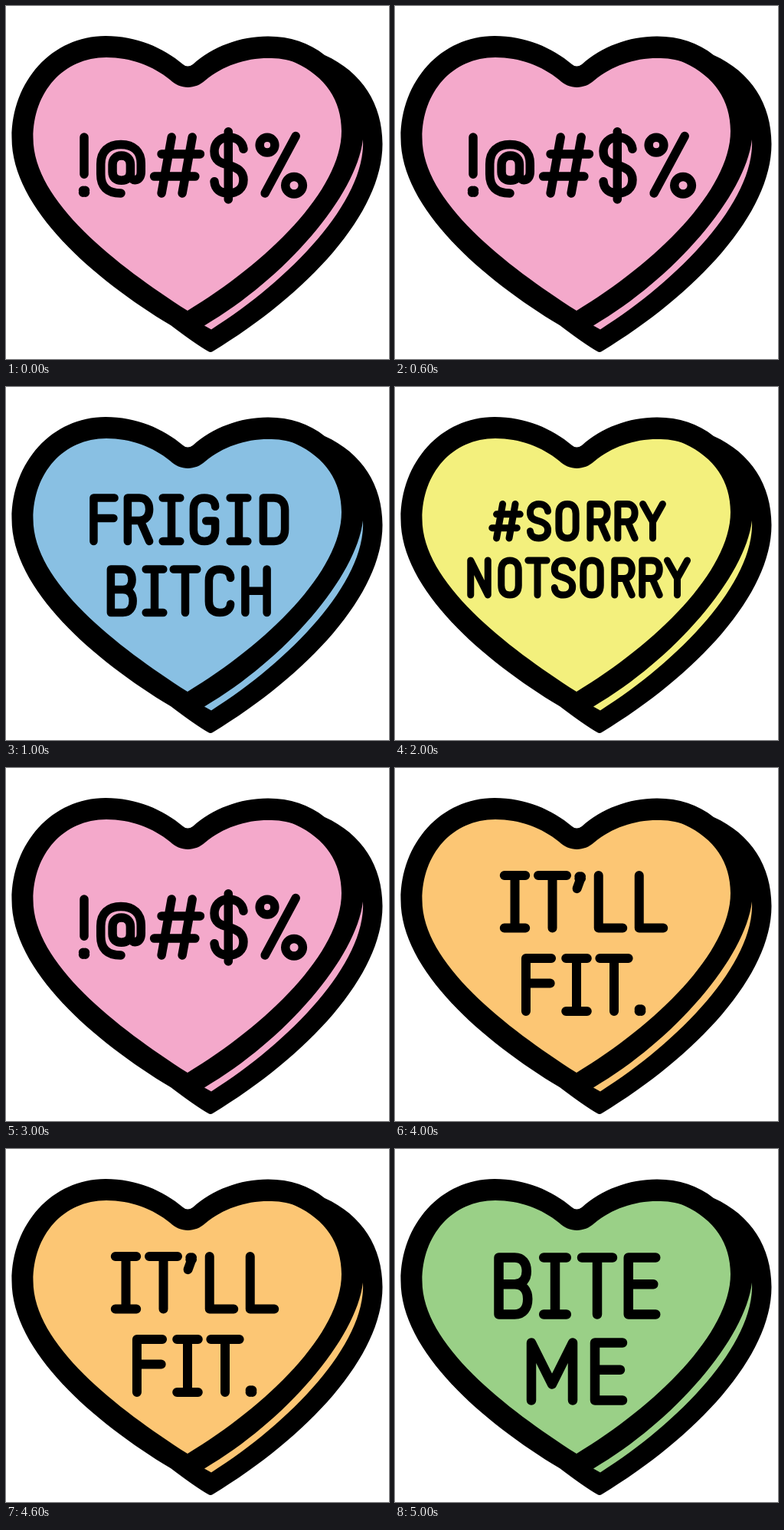
Recreate the animation shown at these times as an HTML page with a canvas. Size 500 by 460 pixels, loop 6 s.

```html
<!DOCTYPE html>
<html lang="en">
<head>
<meta charset="utf-8">
<title>Candy hearts</title>
<style>
  html, body { margin: 0; width: 100%; height: 100%; overflow: hidden; background: #fff; }
  canvas { display: block; width: 500px; height: 460px; }
</style>
</head>
<body>
<canvas id="stage" width="500" height="460" role="img"></canvas>
<script>
const canvas = document.getElementById('stage');
const ctx = canvas.getContext('2d');
const HOLD = 1000;

const outline = new Path2D(`M7.5 172C7.5 98 60 39 130 39C170 39 205 54 231 76Q237 81 244 76
  C270 53 305 39.5 342 39.5C371 39.5 396 48 416 64C465 86 491.5 128 491.5 180
  C491.5 270 394 375 270 450Q267 452 264 450Q248 441 215 416C115 356 7.5 264 7.5 172Z`);
const face = new Path2D(`M35.5 172C35.5 112 75 67 131 67C163 67 192 78 214 96C227 109 247 109 260 97
  C283 78 312 68 342 68C355 68 367 69 378 74C417 92 438 123 438 163
  C438 240 340 335 237 397C145 338 35.5 255 35.5 172Z`);
const side = new Path2D('M466 174C457 248 364 355 259 416.5L268 421.5C370 357 470 255 466 174Z');

const ring = (x, y, r) => `M${x - r} ${y}a${r} ${r} 0 1 0 ${2 * r} 0a${r} ${r} 0 1 0 ${-2 * r} 0Z`;
const dot = (x, y) => `M${x - 2} ${y - 2}l4 4m0-4l-4 4`;
const ess = 'M26 21C24 7 13 0-1 0C-16 0-26 11-26 25C-26 42-15 46 0 50C16 55 26 61 26 76C26 91 15 100-1 100C-15 100-25 93-26 79';
const cee = 'M25 20C25 6 15 0 0 0C-16 0-25 9-25 26V74C-25 91-16 100 0 100C16 100 25 91 25 ';

// Stroke skeletons: centred on x = 0, cap height 100.
const glyphs = {
  B: 'M3 47C18 47 26 58 26 73C26 89 18 100 3 100H-25V0H3C17 0 24 10 24 24C24 38 17 47 3 47H-25',
  C: cee + '80',
  D: 'M-25 0H0C17 0 25 11 25 28V72C25 89 17 100 0 100H-25Z',
  E: 'M24 0H-24V100H24M-24 47H20',
  F: 'M24 0H-24V100M-24 47H22',
  G: cee + '74V53H4',
  H: 'M-25 0V100M25 0V100M-25 50H25',
  I: 'M-20 0H20M0 0V100M-20 100H20',
  L: 'M-23 0V100H23',
  M: 'M-36 100V0L0 72L36 0V100',
  N: 'M-25 100V0L25 100V0',
  O: 'M-25 28C-25 9-15 0 0 0S25 9 25 28V72C25 91 15 100 0 100S-25 91-25 72Z',
  R: 'M-25 100V0H2C18 0 25 12 25 26C25 41 18 52 2 52H-25M4 52L25 100',
  S: ess,
  T: 'M-27 0H27M0 0V100',
  Y: 'M-29 0L0 52L29 0M0 52V100',
  '!': 'M0 0V66' + dot(0, 97),
  '@': 'M0 100C-25 100-36 88-36 66V48C-36 25-22 13 0 13C23 13 36 26 36 47V62C36 80 17 80 17 67V49' +
       'C17 39 11 33 1 33C-9 33-15 39-15 49V62C-15 72-9 77 1 77C11 77 17 72 17 62',
  '#': 'M-28 30H41M-41 70H32M-10 0L-28 100M27 0L9 100',
  '$': ess + 'M-1-10V111',
  '%': 'M25-2L-30 100' + ring(-26, 14, 13.5) + ring(22, 86, 15.5),
  '’': 'M2 6L-5 25' + dot(1, 4),
  '.': dot(0, 98)
};

// Each line: text, top, cap height, glyph centres.
const curse = {
  color: '#f4a9cb', weight: 11.5,
  lines: [['!@#$%', 171, 73, [102, 150, 223.5, 291, 360]]]
};
const hearts = [
  curse,
  { color: '#89c0e3', weight: 10.5, lines: [
    ['FRIGID', 144.5, 56.5, [128, 173, 216, 259, 304, 350]],
    ['BITCH', 237.5, 56.5, [151, 194, 234, 279, 326.5]]] },
  { color: '#f3f07d', weight: 9, lines: [
    ['#SORRY', 152.5, 44.5, [145, 188, 225, 266, 302, 336.5]],
    ['NOTSORRY', 226, 45, [110, 150, 186, 220, 257, 298, 334, 368.5]]] },
  curse,
  { color: '#fcc674', weight: 12, lines: [
    ['IT’LL', 140, 68.5, [156.5, 205.5, 241, 281.5, 334.5]],
    ['FIT.', 248, 69, [187.5, 237, 286, 320]]] },
  { color: '#9ad087', weight: 12.5, lines: [
    ['BITE', 141.5, 74, [154, 209, 264, 322.5]],
    ['ME', 252.5, 75, [205, 279]]] }
];

function drawLine([text, top, height, centres]) {
  const scale = height / 100;
  [...text].forEach((char, i) => {
    const path = new Path2D();
    path.addPath(new Path2D(glyphs[char]), new DOMMatrix([scale, 0, 0, scale, centres[i], top]));
    ctx.stroke(path);
  });
}

function drawHeart({ color, weight, lines }) {
  ctx.fillStyle = '#fff';
  ctx.fillRect(0, 0, 500, 460);
  ctx.fillStyle = '#000';
  ctx.fill(outline);
  ctx.fillStyle = color;
  ctx.fill(face);
  ctx.fill(side);
  ctx.strokeStyle = '#000';
  ctx.lineWidth = weight;
  ctx.lineCap = ctx.lineJoin = 'round';
  lines.forEach(drawLine);
  canvas.setAttribute('aria-label', lines.map(line => line[0]).join(' '));
}

let shown = -1;
function tick() {
  const index = Math.floor(performance.now() / HOLD) % hearts.length;
  if (index !== shown) drawHeart(hearts[shown = index]);
  requestAnimationFrame(tick);
}
tick();
</script>
</body>
</html>
```
